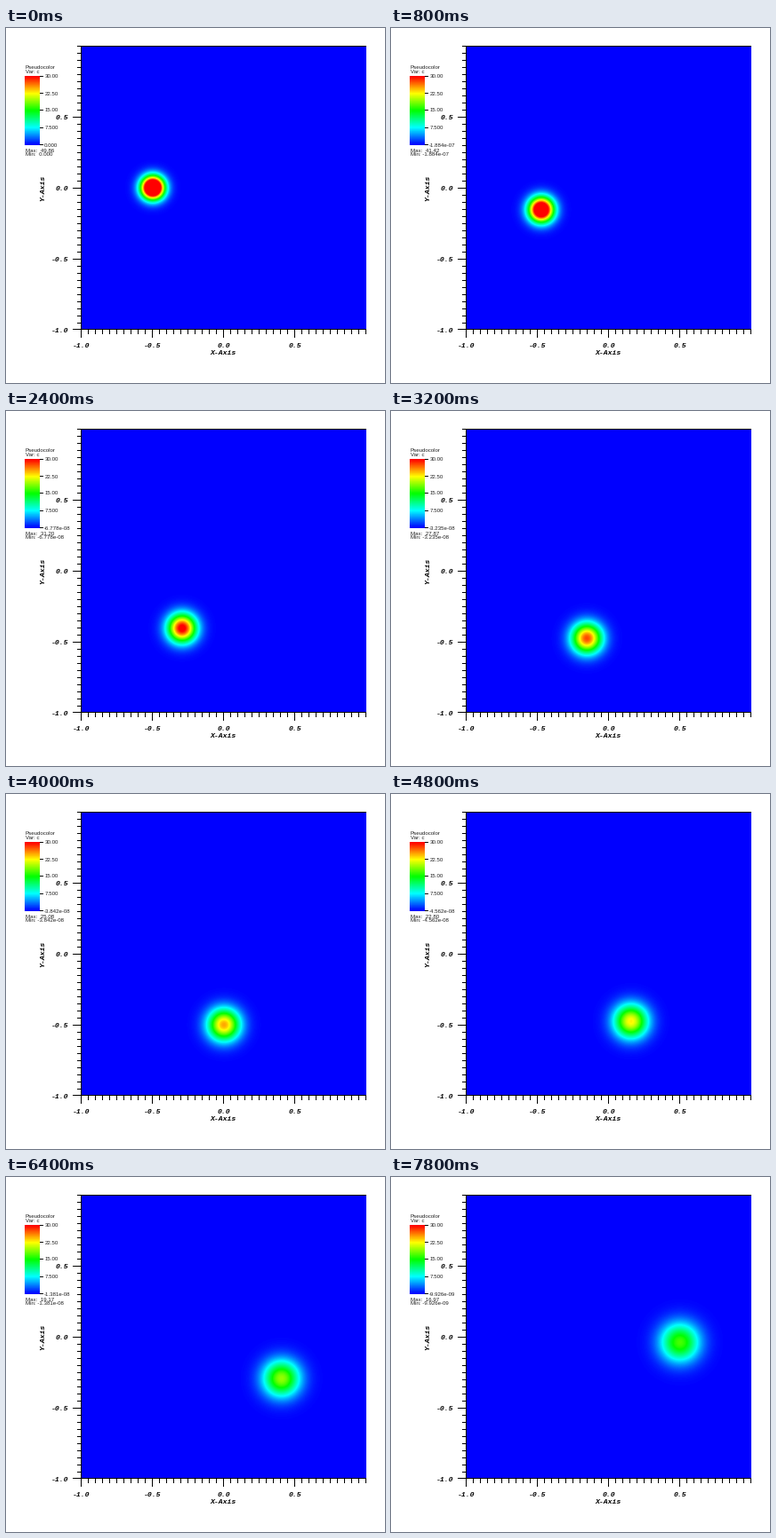
A matplotlib script that plays this animation: 426 px wide and 400 px high, repeating every 8000 ms.

```python
import numpy as np
import matplotlib.pyplot as plt
from matplotlib.animation import FuncAnimation
from matplotlib.colors import LinearSegmentedColormap
from matplotlib.patches import Rectangle

W, H, DPI = 426, 400, 100
FRAMES, STEP_MS = 40, 200
LEFT, TOP, SIDE = 85, 20, 320
UNIT = SIDE / 2
CX, CY = LEFT + UNIT, TOP + UNIT
SPREAD = 0.002 * np.pi * UNIT ** 2

# Readouts known at a few steps; the rest is interpolated.
KEYS = [0, 8, 16, 24, 28, 32, 39]
MAXES = [49.86, 35.43, 27.87, 22.80, 20.76, 19.17, 16.97]
MINS = [2.5e-7, 1.420e-7, 3.235e-8, 4.562e-8, 3.742e-8, 1.381e-8, 9.926e-9]

heat = LinearSegmentedColormap.from_list(
    "heat", [(0, 0, 1), (0, 1, 1), (0, 1, 0), (1, 1, 0), (1, 0, 0)], N=256)

fig = plt.figure(figsize=(W / DPI, H / DPI), dpi=DPI, facecolor="white")
ax = fig.add_axes([0, 0, 1, 1])
ax.set_axis_off()


def box(x, y, w, h):
    ax.add_patch(Rectangle((x, y), w, h, color="black", lw=0,
                           antialiased=False, zorder=3))


def picture(data, x, y, w, h):
    return ax.imshow(data, cmap=heat, vmin=0, vmax=30, aspect="auto",
                     interpolation="nearest", extent=(x, x + w, y + h, y))


def axis_text(x, y, s, ha="center", **kw):
    ax.text(x, y, s, family="Liberation Mono", weight="bold", style="italic",
            size=8.2 * 72 / DPI, ha=ha, va="center_baseline", **kw)


def note(x, y, s):
    return ax.text(x, y, s, family="Liberation Sans", size=6.1 * 72 / DPI,
                   va="baseline", color="#202020")


def field(n):
    grow = 1 + 0.05 * n
    angle = np.pi * (1 + n / FRAMES)
    x0 = CX + UNIT / 2 * np.cos(angle)
    y0 = CY - UNIT / 2 * np.sin(angle)
    px = np.arange(SIDE) + 0.5
    gx = np.exp(-(LEFT + px - x0) ** 2 / (SPREAD * grow))
    gy = np.exp(-(TOP + px - y0) ** 2 / (SPREAD * grow))
    return 50.2 / grow * np.outer(gy, gx)


def readouts(n):
    ratio = np.interp(n, KEYS, [MAXES[0] / m for m in MAXES])
    high = f"{MAXES[0] / ratio:.2f}"
    if n == 0:
        return high, "0.000"
    return high, f"{-np.exp(np.interp(n, KEYS, np.log(MINS))):.3e}"


plot = picture(field(0), LEFT, TOP, SIDE, SIDE)
picture(np.linspace(30, 0, 78)[:, None], 21, 54, 17, 78)
ax.set_xlim(0, W)
ax.set_ylim(H, 0)

# Frame and ticks
box(84, 20, 1, 320)
box(84, 20, 321, 1)
box(84, 339, 321, 1)
for k in range(41):
    major = k % 10 == 0 and k < 40
    box(84 + 8 * k, 340, 1, 9 if major else 5)
    reach = 9 if k % 10 == 0 and k > 0 else 4
    box(84 - reach, min(20 + 8 * k, 339), reach, 1)

for v in (-1.0, -0.5, 0.0, 0.5):
    axis_text(CX - 0.5 + v * UNIT, 357, f"{v:.1f}")
    axis_text(70.5, CY + 0.5 - v * UNIT, f"{v:.1f}", ha="right")
axis_text(244, 366, "X-Axis")
ax.text(42, 180, "Y-Axis", family="Liberation Mono", weight="bold",
        style="italic", size=8.2 * 72 / DPI, ha="center", va="center",
        rotation=90)

# Legend
note(21.5, 46, "Pseudocolor")
note(21.5, 51, "Var: c")
for i, s in enumerate(("30.00", "22.50", "15.00", "7.500")):
    y = 54 + round(19.25 * i)
    box(38, y, 4, 1)
    note(43.5, y + 2.5, s)
box(38, 131, 4, 1)
low_label = note(43, 134, "")
max_label = note(21.5, 139.5, "")
min_label = note(21.5, 144.5, "")


def update(n):
    high, low = readouts(n)
    plot.set_data(field(n))
    low_label.set_text(low)
    max_label.set_text(f"Max:  {high}")
    min_label.set_text(f"Min: {low}" if n else f"Min:  {low}")
    return plot, low_label, max_label, min_label


anim = FuncAnimation(fig, update, frames=FRAMES, interval=STEP_MS,
                     init_func=lambda: update(0), repeat=True,
                     repeat_delay=0, blit=False)
plt.show()
```
